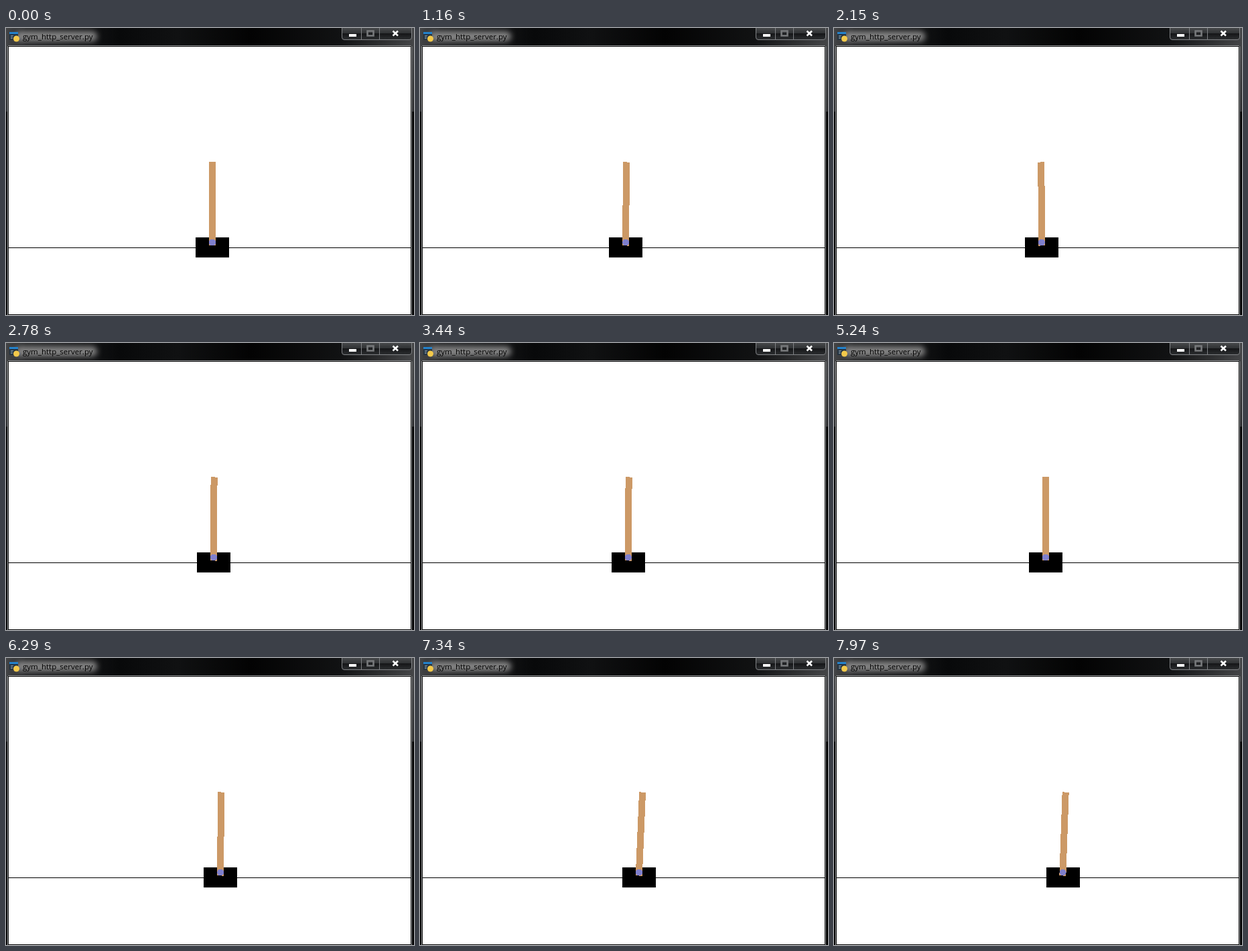
These frames come from a looping animation (609 by 429 pixels, 8 s). An HTML page:

```html
<!DOCTYPE html>
<html lang="en">
<head>
<meta charset="utf-8">
<title>gym_http_server.py</title>
<style>
  html, body { margin: 0; width: 100%; height: 100%; overflow: hidden; background: #000; }
  svg { display: block; width: 609px; height: 429px; }
  .crisp { shape-rendering: crispEdges; }
  text { font: 11.5px "Open Sans", "Noto Sans", sans-serif; }
</style>
</head>
<body>
<svg viewBox="0 0 609 429">
  <defs>
    <linearGradient id="bar">
      <stop offset="0" stop-color="#444547"/>
      <stop offset=".05" stop-color="#242527"/>
      <stop offset=".28" stop-color="#08090a"/>
      <stop offset=".42" stop-color="#101112"/>
      <stop offset=".6" stop-color="#030303"/>
      <stop offset=".82" stop-color="#111213"/>
      <stop offset="1" stop-color="#444547"/>
    </linearGradient>
    <linearGradient id="side" x1="0" y1="0" x2="0" y2="1">
      <stop offset="0" stop-color="#444547"/>
      <stop offset="1" stop-color="#2a2b2d"/>
    </linearGradient>
    <linearGradient id="button" x1="0" y1="0" x2="0" y2="1">
      <stop offset="0" stop-color="#4a4c4e"/>
      <stop offset=".48" stop-color="#303234"/>
      <stop offset=".5" stop-color="#151618"/>
      <stop offset="1" stop-color="#2c2e30"/>
    </linearGradient>
    <filter id="blur" x="-20%" y="-80%" width="140%" height="260%">
      <feGaussianBlur stdDeviation="4.5"/>
    </filter>
    <clipPath id="titleClip"><rect width="609" height="26"/></clipPath>
  </defs>

  <!-- window frame -->
  <rect width="609" height="429"/>
  <rect width="609" height="26" fill="url(#bar)"/>
  <path d="M0 26H2V125H0ZM606 26H609V125H606Z" fill="url(#side)"/>
  <g clip-path="url(#titleClip)">
    <rect x="14" y="5" width="122" height="15" rx="7" fill="#858585" filter="url(#blur)"/>
  </g>
  <rect x="2.5" y="26.5" width="603" height="410" rx="1" stroke="#a0a2a4"/>
  <rect class="crisp" x="4" y="28" width="600" height="400" fill="#fff"/>

  <!-- title icon and text -->
  <g class="crisp">
    <rect x="5" y="6" width="13" height="12" fill="#253442"/>
    <rect x="5" y="6" width="13" height="3" fill="#2382cc"/>
    <path d="M7 11.5H11M7 13.5H10M7 15.5H10" stroke="#8298a8"/>
  </g>
  <circle cx="15.5" cy="16" r="4.5" fill="#f3c94b"/>
  <text x="25" y="17">gym_http_server.py</text>

  <!-- window buttons -->
  <path d="M501.5 -1V14Q501.5 17.5 505 17.5H602Q605.5 17.5 605.5 14V-1Z" fill="url(#button)" stroke="#808285"/>
  <path d="M530.5 0V17M557.5 0V17" stroke="#808285"/>
  <rect class="crisp" x="512" y="9" width="11" height="4" fill="#fff"/>
  <rect x="539.5" y="4.5" width="9" height="7" fill="none" stroke="#77797b" stroke-width="2.6"/>
  <path d="M577.5 4.5L585 11.5M585 4.5L577.5 11.5" stroke="#fff" stroke-width="2.6"/>

  <!-- track, cart and pole -->
  <g class="crisp">
    <rect x="4" y="328" width="600" height="1"/>
    <rect id="cart" y="313" width="50" height="30"/>
    <polygon id="pole" fill="#cc9966"/>
    <circle id="axle" cy="320.5" r="5" fill="#7f7fcc"/>
  </g>
</svg>
<script>
const LOOP = 8000, HOLD = 500, STEP = 30;
const AXLE_Y = 320.5, HALF = 5, REACH = 120;

// Key poses: simulation step, cart's left edge, pole lean in radians
const poses = [
  [-1, 282.88, .005], [55, 284.83, -.0017], [98, 285.92, .004], [158, 291.07, -.002],
  [193, 295.08, .009], [228, 302.12, .039], [249, 316.41, .0375]
];

const cart = document.getElementById("cart");
const pole = document.getElementById("pole");
const axle = document.getElementById("axle");

function slope(i, k) {
  const a = poses[Math.max(i - 1, 0)], b = poses[Math.min(i + 1, poses.length - 1)];
  return (b[k] - a[k]) / (b[0] - a[0]);
}

// Smooth cubic curve through column k of the poses
function curve(k, step) {
  let i = 0;
  while (i < poses.length - 2 && step >= poses[i + 1][0]) i++;
  const a = poses[i], b = poses[i + 1];
  const w = b[0] - a[0], u = (step - a[0]) / w, v = 1 - u;
  return a[k] * v * v * (1 + 2 * u) + b[k] * u * u * (3 - 2 * u)
    + w * u * v * (slope(i, k) * v - slope(i + 1, k) * u);
}

// The cart first swings left, then settles
function dip(step) {
  const s = (step + 1) / 8;
  return 3 * s * Math.exp(1 - s);
}

function draw(time) {
  const step = time < HOLD ? -1 : Math.floor((time - HOLD) / STEP);
  // The controller pushes left and right in turn
  const push = step % 2 ? 1 : -1;
  const left = curve(1, step) - dip(step) + .12 * push;
  const lean = curve(2, step) - .003 * push;
  const x = left + 25, s = Math.sin(lean), c = Math.cos(lean);
  const corner = (px, py) => `${x + px * c + py * s},${AXLE_Y + px * s - py * c}`;

  cart.setAttribute("x", left);
  axle.setAttribute("cx", x);
  pole.setAttribute("points", [
    corner(-HALF, -HALF), corner(-HALF, REACH), corner(HALF, REACH), corner(HALF, -HALF)
  ].join(" "));
}

const start = performance.now();
function tick() {
  draw((performance.now() - start) % LOOP);
  requestAnimationFrame(tick);
}
tick();
</script>
</body>
</html>
```
